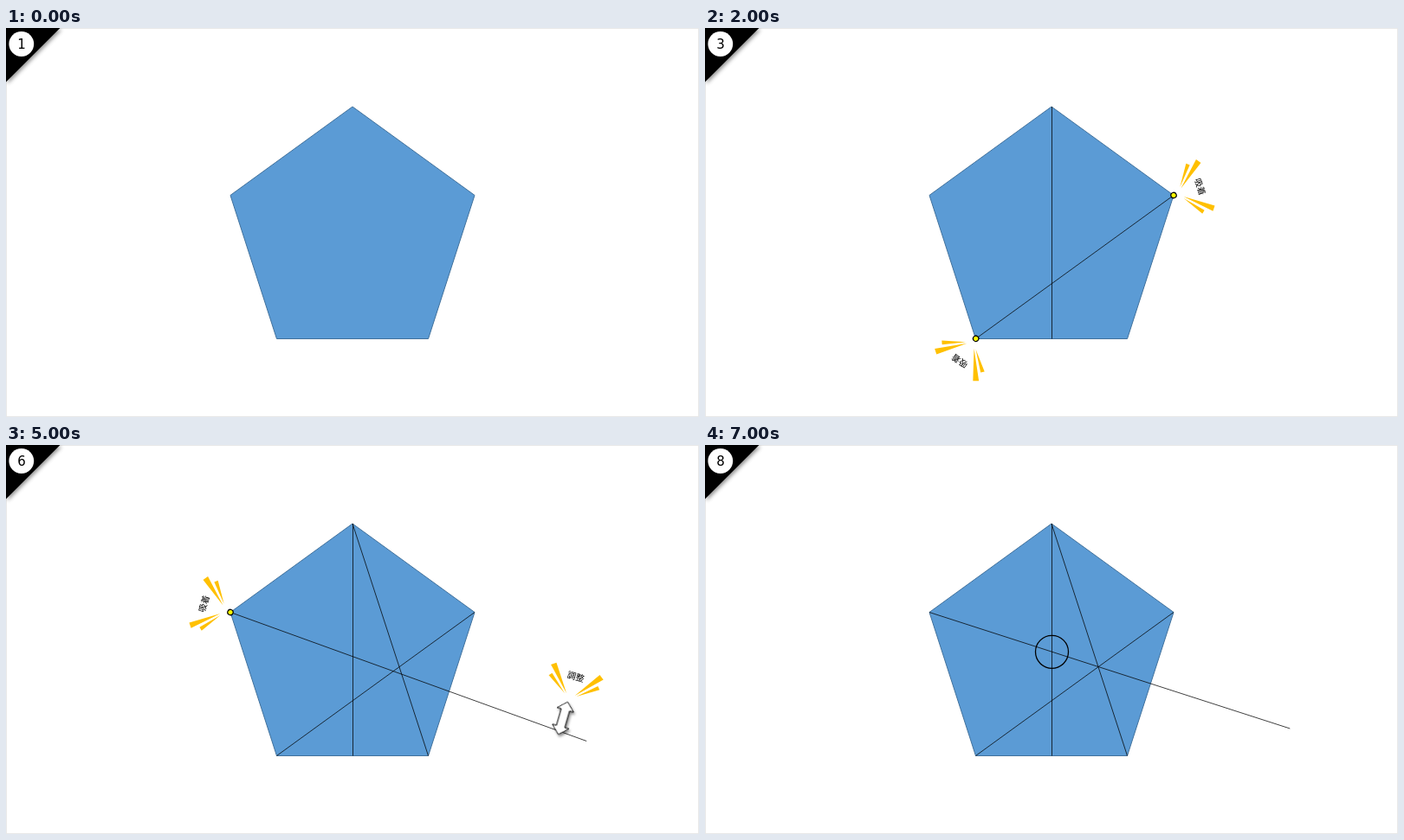
Write an HTML page that moves like this. It is 800x450 px and loops after 8 s.

```html
<!DOCTYPE html>
<html lang="ja">
<head>
<meta charset="utf-8">
<title>Centre of a pentagon</title>
<style>
  html, body { margin: 0; width: 100%; height: 100%; overflow: hidden; background: #fff; }
  svg { display: block; width: 800px; height: 450px; }
  line { stroke: #000; stroke-width: .75; }
  text { font-family: "Noto Sans CJK JP", "Noto Sans CJK", sans-serif; font-size: 10px; text-anchor: middle; }
  .num text { font: 15px "DejaVu Sans", sans-serif; }
  .corner { filter: drop-shadow(2px 2px 2px rgba(0, 0, 0, .4)); }
  .arrow { fill: #fff; stroke: #000; filter: drop-shadow(2px 2px 1.5px rgba(0, 0, 0, .45)); }

  /* each step owns one eighth of the loop */
  .step { visibility: hidden; animation: slot 8s step-end calc((var(--i) - 9) * 1s) infinite; }
  @keyframes slot {
    0% { visibility: visible; }
    12.5%, 100% { visibility: hidden; }
  }
</style>
</head>
<body>
<svg viewBox="0 0 800 450">
  <defs>
    <g id="ray" fill="#ffc000">
      <path d="M5-10.5 26-41.5 31.5-37.5Z"/>
      <path d="M7-10 27.5-28.5 30.5-25Z"/>
    </g>
    <g id="rays">
      <use href="#ray"/>
      <use href="#ray" transform="scale(-1 1)"/>
    </g>
    <circle id="dot" r="3.2" fill="#ff0" stroke="#000" stroke-width="1.2"/>
    <g id="snap">
      <use href="#rays"/>
      <text y="-28.3">吸着</text>
      <use href="#dot"/>
    </g>
    <g id="adjust">
      <g transform="translate(649 298.8) rotate(16)">
        <use href="#rays"/>
        <text y="-28.3">調整</text>
      </g>
      <path class="arrow" transform="translate(643 316) rotate(16)"
        d="M0-19.5 10-10H5V10H10L0 19.5-10 10H-5V-10H-10Z"/>
    </g>

    <!-- construction lines, each set includes the one before -->
    <g id="one"><line x1="400.5" y1="91" x2="400.5" y2="359.5"/></g>
    <g id="two"><use href="#one"/><line x1="312.5" y1="359.5" x2="541" y2="193.5"/></g>
    <g id="three"><use href="#two"/><line x1="400" y1="91" x2="487.5" y2="359.5"/></g>
    <g id="four"><use href="#three"/><line x1="259" y1="193.5" x2="675.3" y2="328"/></g>

    <!-- snap marks on the corners -->
    <use id="top" href="#snap" transform="translate(400 91)"/>
    <use id="right" href="#snap" transform="translate(541 193.5) rotate(72)"/>
    <use id="lowRight" href="#snap" transform="translate(487.5 359.2) rotate(144)"/>
    <use id="base" href="#snap" transform="translate(400 359.5) rotate(180)"/>
    <use id="lowLeft" href="#snap" transform="translate(312.7 359.3) rotate(216)"/>
    <use id="left" href="#snap" transform="translate(259 193.5) rotate(-72)"/>
  </defs>

  <rect x=".5" y=".5" width="799" height="449" fill="#fff" stroke="#e8e8e8"/>
  <path class="corner" d="M0 0H62.5L0 62.5Z"/>
  <circle cx="17.8" cy="18.5" r="14.4" fill="#fff"/>
  <path d="M400 91 541 193.5 487.5 359.5H312.5L259 193.5Z" fill="#5b9bd5" stroke="#41719c"/>

  <g class="step" style="--i:1">
    <g class="num"><text x="18" y="24.3">1</text></g>
  </g>
  <g class="step" style="--i:2">
    <g class="num"><text x="18" y="24.3">2</text></g>
    <use href="#one"/>
    <use href="#top"/>
    <use href="#base"/>
  </g>
  <g class="step" style="--i:3">
    <g class="num"><text x="18" y="24.3">3</text></g>
    <use href="#two"/>
    <use href="#right"/>
    <use href="#lowLeft"/>
  </g>
  <g class="step" style="--i:4">
    <g class="num"><text x="18" y="24.3">4</text></g>
    <use href="#three"/>
    <use href="#top"/>
    <use href="#lowRight"/>
  </g>
  <g class="step" style="--i:5">
    <g class="num"><text x="18" y="24.3">5</text></g>
    <use href="#three"/>
    <line x1="259" y1="193.5" x2="680.3" y2="313.2"/>
    <use href="#left"/>
    <use href="#adjust"/>
  </g>
  <g class="step" style="--i:6">
    <g class="num"><text x="18" y="24.3">6</text></g>
    <use href="#three"/>
    <line x1="259" y1="193.5" x2="670.2" y2="342.5"/>
    <use href="#left"/>
    <use href="#adjust"/>
  </g>
  <g class="step" style="--i:7">
    <g class="num"><text x="18" y="24.3">7</text></g>
    <use href="#four"/>
    <use href="#left"/>
    <use href="#dot" x="454.6" y="256.5"/>
  </g>
  <g class="step" style="--i:8">
    <g class="num"><text x="18" y="24.3">8</text></g>
    <use href="#four"/>
    <circle cx="400.5" cy="239.3" r="19" fill="none" stroke="#000" stroke-width="1.3"/>
  </g>
</svg>
</body>
</html>
```
